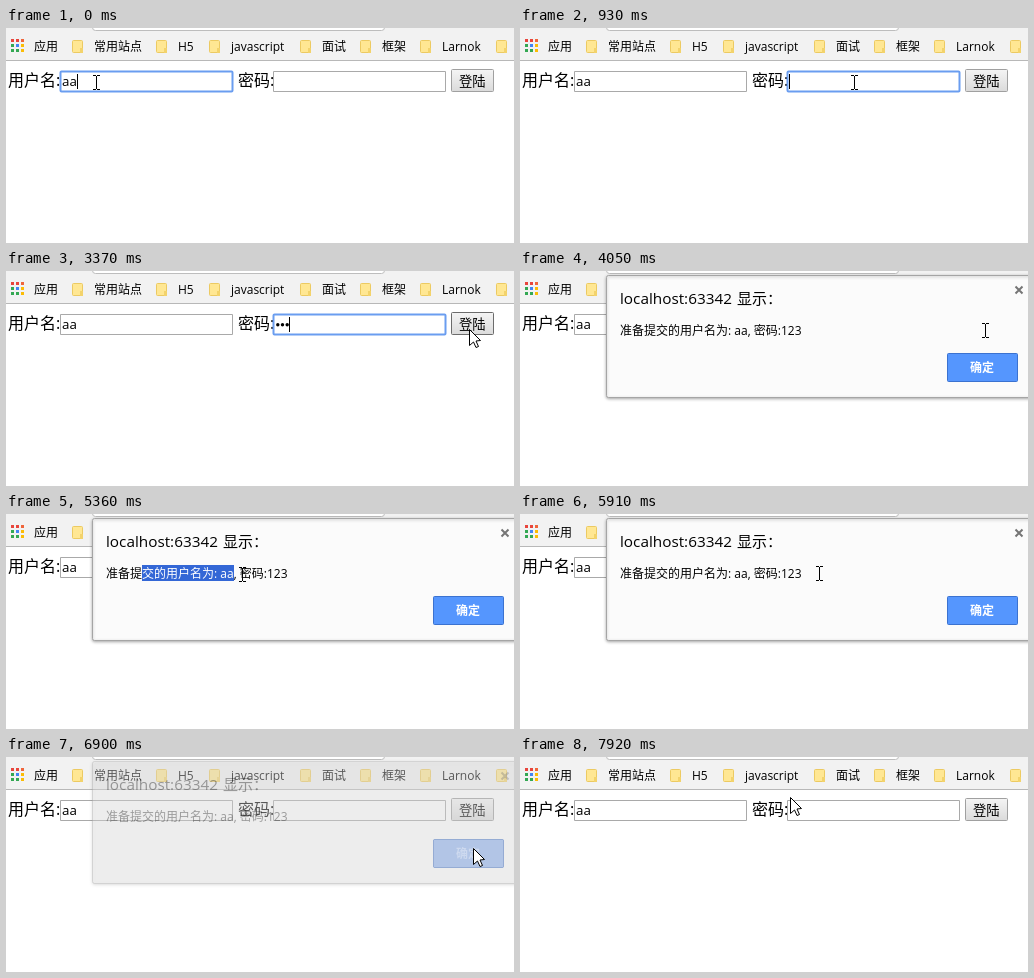
Animation of 508x215 px, one loop 8 s. Source, as an HTML page with a canvas:

```html
<!DOCTYPE html>
<html lang="zh">
<head>
<meta charset="utf-8">
<title>登陆</title>
<style>
html, body { margin: 0; width: 100%; height: 100%; overflow: hidden; background: #fff; }
canvas { display: block; }
</style>
</head>
<body>
<canvas id="stage" width="508" height="215"></canvas>
<script>
const ctx = document.getElementById('stage').getContext('2d');
const LOOP = 8000;
const FONT = '"Open Sans", "Noto Sans CJK SC", sans-serif';

// Each track lists [start, ...values]; values hold until the next entry.
const pointer = [
  [0, 'I', 90, 54], [150, 'A', 220, 70], [270, 'A', 326, 81], [420, 'A', 347, 83],
  [540, 'A', 338, 74], [690, 'I', 334, 56], [810, 'I', 334, 54],
  [2580, 'I', 345, 55], [2700, 'I', 400, 56], [2820, 'A', 446, 59], [2940, 'A', 462, 59],
  [3060, 'A', 463, 58], [3900, 'I', 465, 59],
  [4610, 'I', 462, 66], [4730, 'A', 440, 90], [4850, 'A', 360, 80], [4970, 'A', 230, 68],
  [5090, 'I', 150, 61], [5210, 'I', 136, 61], [5360, 'I', 236, 60], [5510, 'I', 288, 57],
  [5790, 'I', 299, 59], [6060, 'I', 316, 66], [6210, 'A', 420, 89], [6360, 'A', 465, 91],
  [6510, 'A', 467, 91], [7020, 'A', 440, 91], [7140, 'A', 374, 89], [7290, 'A', 310, 74],
  [7410, 'I', 280, 63], [7560, 'I', 275, 58], [7680, 'I', 272, 52], [7800, 'A', 270, 46],
  [7920, 'A', 270, 40]
];
const focus = [[0, 'user'], [810, 'pass'], [3620, '']];
const caret = [[0, 1], [150, 0], [810, 1], [1460, 0], [1890, 1], [2820, 0], [3370, 1]];
const dots = [[0, 0], [2040, 1], [2160, 2], [2310, 3], [6780, 0]];
const loginState = [[0, ''], [2820, 'hover'], [3620, 'down'], [3900, '']];
const dialogAlpha = [[0, 0], [3900, .15], [4050, 1], [6780, .7], [6900, .35], [7020, .1], [7140, 0]];
const selectionEnd = [[0, 0], [5360, 228], [5510, 282], [5910, 0]];
const okState = [[0, ''], [4730, 'hover'], [4850, ''], [6510, 'hover'], [6630, 'down']];

function at(track, t) {
  let value = track[0];
  for (const key of track) if (key[0] <= t) value = key;
  return value.slice(1);
}

function rect(x, y, w, h, color) {
  ctx.fillStyle = color;
  ctx.fillRect(x, y, w, h);
}

function box(x, y, w, h, r, fill, stroke, line = 1) {
  ctx.beginPath();
  ctx.roundRect(x + .5, y + .5, w - 1, h - 1, r);
  ctx.fillStyle = fill;
  ctx.fill();
  ctx.strokeStyle = stroke;
  ctx.lineWidth = line;
  ctx.stroke();
}

function text(str, x, y, size, color = '#000', weight = 400) {
  ctx.font = `${weight} ${size}px ${FONT}`;
  ctx.fillStyle = color;
  ctx.fillText(str, x, y);
}

function shade(y, h, top, bottom) {
  const g = ctx.createLinearGradient(0, y, 0, y + h);
  g.addColorStop(0, top);
  g.addColorStop(1, bottom);
  return g;
}

function folder(x) {
  box(x, 12, 11, 13, 1, '#ffe793', '#ecca62');
  rect(x + 8, 20, 3, 5, '#f3d36c');
}

function drawBar() {
  rect(0, 0, 508, 32, '#f2f2f2');
  rect(0, 32, 508, 1, '#b8b8b8');
  box(86, -10, 293, 13, 3, '#fff', '#bdbdbd');
  const colors = ['#e8453c', '#e8453c', '#f0653a', '#34a853', '#4285f4', '#fbbc05',
    '#34a853', '#34a853', '#fbbc05'];
  colors.forEach((c, i) => rect(5 + i % 3 * 5, 11 + Math.floor(i / 3) * 5, 3, 3, c));
  text('应用', 28, 23, 12);
  const marks = [['常用站点', 66], ['H5', 150], ['javascript', 203], ['面试', 294],
    ['框架', 354], ['Larnok', 414], ['', 490]];
  for (const [name, x] of marks) {
    folder(x);
    text(name, x + 22, 23, 12);
  }
}

function field(x, focused) {
  if (focused) box(x, 43, 173, 21, 1, '#fff', '#6a9df0', 2);
  else box(x, 43, 173, 21, 0, '#fff', '#a9a9a9');
}

function drawForm(t) {
  const [active] = at(focus, t), [count] = at(dots, t), [state] = at(loginState, t);
  text('用户名:', 2, 58, 16);
  field(54, active === 'user');
  text('aa', 56, 58, 13.33);
  text('密码:', 232, 58, 16);
  field(267, active === 'pass');
  for (let i = 0; i < count; i++) {
    ctx.beginPath();
    ctx.arc(271.8 + i * 4.7, 53.8, 1.7, 0, 7);
    ctx.fillStyle = '#000';
    ctx.fill();
  }
  if (active && at(caret, t)[0]) {
    rect(active === 'user' ? 71 : Math.floor(269 + count * 4.7), 46, 1, 15, '#000');
  }
  const fill = state === 'down' ? shade(41, 23, '#dcdcdc', '#eee') : shade(41, 23, '#f5f5f5', '#dadada');
  box(445, 41, 43, 23, 1, fill, state ? '#6c6c6c' : '#a0a0a0');
  text('登陆', 453, 58, 13.33);
}

function drawDialog(t) {
  const [alpha] = at(dialogAlpha, t);
  if (!alpha) return;
  ctx.save();
  ctx.globalAlpha = alpha;
  ctx.shadowColor = 'rgba(0,0,0,.3)';
  ctx.shadowBlur = 3;
  ctx.shadowOffsetY = 1;
  box(86, 4, 430, 123, 2, '#fbfbfb', '#a5a5a5');
  ctx.shadowColor = 'transparent';

  text('localhost:63342', 100, 33, 15.3);
  text('显示：', 217, 33, 15);
  const message = '准备提交的用户名为: aa, 密码:123';
  text(message, 100, 64, 12);
  const [end] = at(selectionEnd, t);
  if (end) {
    ctx.save();
    ctx.beginPath();
    ctx.rect(136, 51, end - 136, 16);
    ctx.clip();
    rect(136, 51, end - 136, 16, '#3367d6');
    text(message, 100, 64, 12, '#fff');
    ctx.restore();
  }

  ctx.beginPath();
  ctx.moveTo(495.5, 15.5);
  ctx.lineTo(502.5, 22.5);
  ctx.moveTo(502.5, 15.5);
  ctx.lineTo(495.5, 22.5);
  ctx.strokeStyle = '#757575';
  ctx.lineWidth = 2;
  ctx.stroke();

  const [state] = at(okState, t);
  const fill = { '': '#5596fe', hover: '#4a8af4', down: '#4379d8' }[state];
  box(427, 82, 71, 29, 1, fill, state ? '#2a56ab' : '#3b72d0');
  text('确定', 450, 101, 12, '#fff', 700);
  ctx.restore();
}

function drawPointer(t) {
  const [kind, x, y] = at(pointer, t);
  if (kind === 'I') {
    rect(x, y - 6, 1, 13, '#000');
    for (const edge of [y - 7, y + 7]) {
      rect(x - 3, edge, 3, 1, '#000');
      rect(x + 1, edge, 3, 1, '#000');
    }
    return;
  }
  ctx.save();
  ctx.translate(x + .5, y + .5);
  ctx.beginPath();
  const outline = [[0, 0], [0, 16], [4, 12.5], [6.5, 18], [9, 17], [6.5, 11.5], [11, 11]];
  for (const p of outline) ctx.lineTo(...p);
  ctx.closePath();
  ctx.fillStyle = '#fff';
  ctx.fill();
  ctx.strokeStyle = '#000';
  ctx.lineWidth = 1;
  ctx.stroke();
  ctx.restore();
}

const start = performance.now();
function draw() {
  const t = (performance.now() - start) % LOOP;
  rect(0, 0, 508, 215, '#fff');
  drawBar();
  drawForm(t);
  drawDialog(t);
  drawPointer(t);
  requestAnimationFrame(draw);
}
draw();
</script>
</body>
</html>
```
